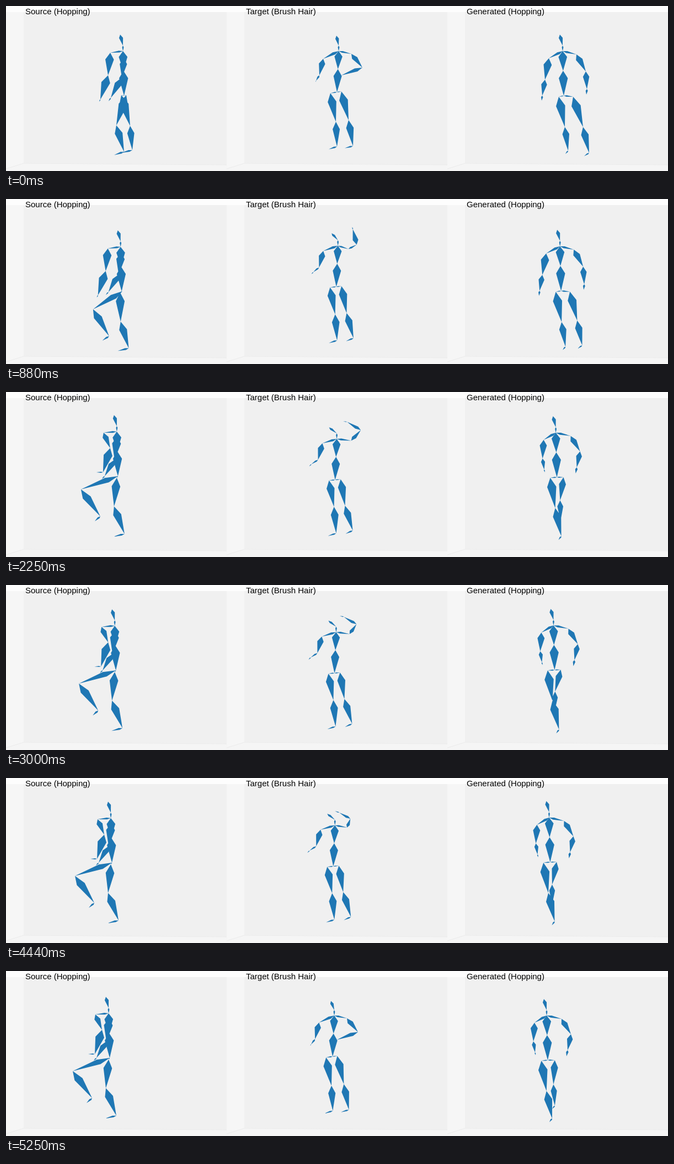
Recreate the animation shown at these times as an HTML page. Size 1200 by 300 pixels, loop 5310 ms.

```html
<!DOCTYPE html>
<html lang="en">
<head>
<meta charset="utf-8">
<title>Motion transfer</title>
<style>
  html, body { margin: 0; width: 100%; height: 100%; overflow: hidden; background: #fdfdfd; }
  svg { display: block; width: 1200px; height: 300px; }
  text { font: 15px "Liberation Sans", Arial, sans-serif; }
</style>
</head>
<body>
<svg viewBox="0 0 1200 300">
  <defs>
    <g id="room">
      <path fill="#f6f6f6" d="M0 11H32V286L0 296Z"/>
      <path fill="#f0f0f0" d="M32 11H400V289L32 286Z"/>
      <path fill="#f5f5f5" d="M0 296L32 286L400 289V300H0Z"/>
      <path fill="none" stroke="#ebebeb" d="M0 296L32 286L400 289"/>
    </g>
  </defs>
  <use href="#room"/>
  <use href="#room" x="400"/>
  <use href="#room" x="800"/>
  <path id="bones" fill="#1f77b4"/>
  <text x="35" y="15">Source (Hopping)</text>
  <text x="435" y="15">Target (Brush Hair)</text>
  <text x="835" y="15">Generated (Hopping)</text>
</svg>
<script>
const LOOP = 5310, FRAMES = 85;
const ARM = [.17, .19, .18, .2], LEG = [.2, .15, .145, .2];

// Eased value at a frame, from [frame, value] points
function track(points, frame) {
  const next = points.findIndex(p => p[0] > frame);
  if (next === 0) return points[0][1];
  if (next < 0) return points[points.length - 1][1];
  const [f0, v0] = points[next - 1], [f1, v1] = points[next];
  const u = (frame - f0) / (f1 - f0);
  return v0 + (v1 - v0) * u * u * (3 - 2 * u);
}

// Blend neighbouring poses: phase 0 is the first, 1 the second and so on
function blend(poses, phase) {
  const i = Math.max(0, Math.min(Math.floor(phase), poses.length - 2));
  return poses[i].map((v, k) => v + (poses[i + 1][k] - v) * (phase - i));
}

// A bone is a kite, widest near its first joint
function bone([ax, ay], [bx, by], width) {
  const dx = bx - ax, dy = by - ay;
  const mx = ax + dx * .3, my = ay + dy * .3;
  const ox = -dy * width, oy = dx * width * .4;
  return `M${ax} ${ay}L${mx + ox} ${my + oy}L${bx} ${by}L${mx - ox} ${my - oy}Z`;
}

// Bones laid end to end, each given as a step from the last joint
function chain([x, y], steps, widths) {
  return widths.map((w, i) => {
    const from = [x, y];
    return bone(from, [x += steps[2 * i], y += steps[2 * i + 1]], w);
  }).join("");
}

function drawFigure({ drift, height, torso, head, arms, legs }, frame) {
  const x = drift[0] + (drift[1] - drift[0]) * frame / (FRAMES - 1);
  const y = track(height, frame);
  const [dx, dy] = torso;
  const [hx, hy] = blend(head.poses, track(head.phase, frame));
  const limbs = (list, root, widths) => list.map(({ phase, poses }) =>
    chain(root, blend(poses, track(phase, frame)), widths)).join("");
  return chain([x + hx, y - 10 + hy], [-hx, -hy, 0, 10], [.18, .15])
    + chain([x, y], [dx * .44, dy * .44, dx * .56, dy * .56], [.22, .18])
    + limbs(arms, [x, y], ARM) + limbs(legs, [x + dx, y + dy], LEG);
}

const move = (phase, ...poses) => ({ phase, poses });
const upright = move([[0, 0]], [-5, -20], [-5, -20]);

const raise = [[3, 0], [20, 1]], fold = [[23, 0], [36, 1]];
const hopper = {
  drift: [212, 186],
  height: [[0, 82], [14, 87], [18, 68], [23, 74], [36, 72], [59, 76], [71, 73], [84, 77]],
  torso: [2, 81],
  head: upright,
  arms: [
    move(fold, [-23, 3, -4, 41, -14, 44, -2, 4], [-24, 2, 12, 28, -13, 44, -12, 0]),
    move(raise, [2, 13, -4, 35, -20, 37, -4, 6], [1, 9, -5, 42, -18, 30, -5, 5])],
  legs: [
    move(raise, [4, -1, -18, 55, 14, 48, -18, 6], [0, 0, -67, 24, 35, 49, -10, 9]),
    move(raise, [-5, -1, 16, 56, 4, 44, -20, 5], [-2, 3, -5, 52, 19, 50, -20, 5])]
};

const brush = [[2, 0], [20, 1], [71, 1], [84, .2]];
const stroke = [[0, 0], [14, 1], [23, 2], [71, 3], [84, 0]];
const brusher = {
  drift: [603, 595],
  height: [[0, 82], [14, 85], [71, 86], [84, 81]],
  torso: [-3, 74.5],
  head: move(brush, [-4, -18], [-14, -11]),
  arms: [
    move(brush, [-28, 14, -7, 30, -6, 10, -1, 2], [-26, 8, -8, 30, -12, 8, -4, 4]),
    move(stroke, [23, 5, 20, 25, -38, 14, -1, 1], [19, 6, 15, -8, -7, -28, -1, -4],
      [27, 3, 20, -20, -26, -16, -7, 0], [22, 4, 6, -16, -20, -11, -8, -3])],
  legs: [
    move(brush, [-12, 2, 10, 52, 2, 45, -15, 5], [-11, 1, 9, 48, 4, 48, -15, 5]),
    move(brush, [8, -1, 13, 52, 8, 47, -15, 4], [10, -1, 8, 48, 14, 45, -13, 6])]
};

const shift = [[6, 0], [34, 1], [59, 1.3], [84, .85]], tuck = [[18, 0], [34, 1]];
const follower = {
  drift: [1009, 980],
  height: [[0, 82], [14, 86], [18, 71], [23, 76], [36, 74], [71, 72], [84, 81]],
  torso: [2, 81],
  head: upright,
  arms: [
    move(tuck, [-25, 13, -7, 39, -5, 29, -1, 9], [-22, 13, -2, 34, 3, 20, 1, 5]),
    move(tuck, [25, 6, 17, 31, 2, 32, -1, 10], [27, 6, 17, 28, -6, 29, -2, 11])],
  legs: [
    move(shift, [-9, 2, 11, 55, 6, 43, -5, 6], [-12, 1, 9, 55, 11, 51, -5, 7]),
    move(shift, [17, 2, 18, 55, 11, 47, -9, 6], [12, 0, -6, 42, 1, 37, -4, 6])]
};

const path = document.getElementById("bones");
function draw(now) {
  let frame = Math.floor(now % LOOP / LOOP * FRAMES);
  if (frame % 16 === 8) frame--;   // every sixteenth frame is held
  path.setAttribute("d",
    [hopper, brusher, follower].map(f => drawFigure(f, frame)).join(""));
}
let start;
function tick(now) {
  start ??= now;
  draw(now - start);
  requestAnimationFrame(tick);
}
draw(0);
requestAnimationFrame(tick);
</script>
</body>
</html>
```
